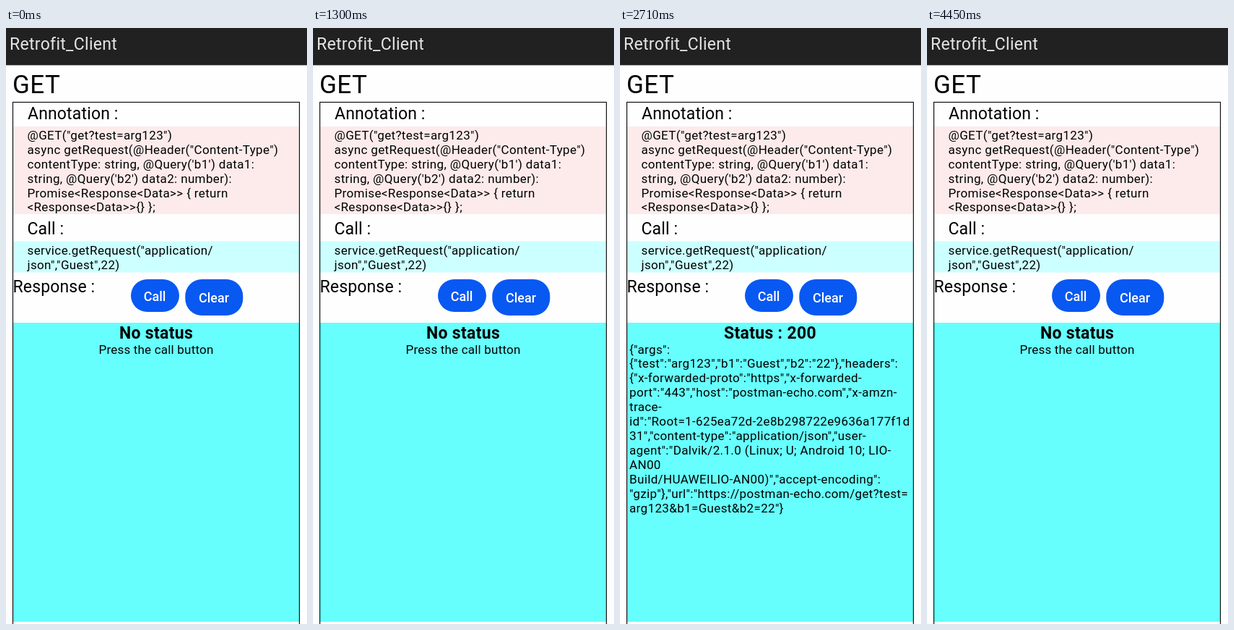
Animation of 417 by 823 pixels, one loop 4.6 s. Source, as an HTML page:

```html
<!DOCTYPE html>
<html lang="en">
<head>
<meta charset="utf-8">
<title>Retrofit_Client</title>
<style>
html, body { margin: 0; width: 100%; height: 100%; overflow: hidden; background: #fefefe; }
svg { display: block; width: 417px; height: 823px; font-family: Roboto, "Noto Sans", sans-serif; }
text { white-space: pre; fill: #000; }
.heading { font-size: 23px; letter-spacing: .15px; }
.title { font-size: 23px; letter-spacing: .3px; fill: #e5e5e5; }
.method { font-size: 35px; letter-spacing: .5px; }
.code { font-size: 17px; letter-spacing: .36px; }
.status { font-size: 23px; font-weight: 700; letter-spacing: .3px; text-anchor: middle; }
.hint { font-size: 17px; letter-spacing: .2px; text-anchor: middle; }
.label { font-size: 18px; font-weight: 500; fill: #fff; text-anchor: middle; }
.button { fill: #0858f2; }
.touch { fill: #fff; stroke: #fff; stroke-opacity: .35; opacity: 0; }

#idle, #result, .touch { animation: 4600ms step-end infinite; }
#idle { animation-name: idle; }
#result { animation-name: result; }
#tapCall { animation-name: tap-call; }
#tapClear { animation-name: tap-clear; }
/* 2100 ms: response arrives, 3660 ms: cleared */
@keyframes idle { 0%, 79.565% { visibility: visible; } 45.652% { visibility: hidden; } }
@keyframes result { 0%, 79.565% { visibility: hidden; } 45.652% { visibility: visible; } }
/* taps at 820 ms and 3660 ms */
@keyframes tap-call { 0%, 23.043% { opacity: 0; } 17.826% { opacity: .36; } 20.435% { opacity: .2; } }
@keyframes tap-clear { 0%, 84.782% { opacity: 0; } 79.565% { opacity: .42; } 82.174% { opacity: .24; } }
</style>
</head>
<body>
<svg viewBox="0 0 417 823">
  <rect width="417" height="823" fill="#fefefe"/>
  <rect width="417" height="51.4" fill="#212121"/>
  <text class="title" x="5" y="29.5">Retrofit_Client</text>
  <text class="method" x="9" y="90">GET</text>

  <rect x="10" y="136" width="396" height="121" fill="#fdebeb"/>
  <rect x="10" y="294.5" width="396" height="43" fill="#ccffff"/>
  <rect x="10" y="407" width="396" height="413" fill="#66fffd"/>
  <rect x="9.5" y="102.5" width="397" height="740" fill="none" stroke="#111" stroke-width="1.2"/>

  <text class="heading" x="30" y="126">Annotation :</text>
  <text class="code" id="annotation"></text>
  <text class="heading" x="29.5" y="285">Call :</text>
  <text class="code" id="call"></text>
  <text class="heading" x="9.5" y="364.5">Response :</text>

  <rect class="button" x="173" y="347" width="67" height="45" rx="22.5"/>
  <text class="label" x="206" y="377">Call</text>
  <rect class="button" x="248.3" y="347" width="80" height="50" rx="23"/>
  <text class="label" x="288" y="379">Clear</text>

  <g id="idle">
    <text class="status" x="208" y="429">No status</text>
    <text class="hint" x="208" y="449.5">Press the call button</text>
  </g>
  <g id="result">
    <text class="status" x="208" y="429">Status : 200</text>
    <text class="code" id="body"></text>
  </g>

  <circle class="touch" id="tapCall" cx="209" cy="373" r="12.5"/>
  <circle class="touch" id="tapClear" cx="311" cy="377" r="12.5"/>
</svg>
<script>
const LINE_HEIGHT = 19.95;

function setLines(id, x, y, lines) {
  const text = document.getElementById(id);
  lines.forEach((line, i) => {
    const span = document.createElementNS(text.namespaceURI, 'tspan');
    span.setAttribute('x', x);
    span.setAttribute('y', y + i * LINE_HEIGHT);
    span.textContent = line;
    text.append(span);
  });
}

setLines('annotation', 29.5, 153.7, [
  '@GET("get?test=arg123")',
  'async getRequest(@Header("Content-Type")',
  "contentType: string, @Query('b1') data1:",
  "string, @Query('b2') data2: number):",
  'Promise<Response<Data>> { return',
  '<Response<Data>>{} };'
]);

setLines('call', 29.5, 313.2, [
  'service.getRequest("application/',
  'json","Guest",22)'
]);

setLines('body', 13, 449.5, [
  '{"args":',
  '{"test":"arg123","b1":"Guest","b2":"22"},"headers":',
  '{"x-forwarded-proto":"https","x-forwarded-',
  'port":"443","host":"postman-echo.com","x-amzn-',
  'trace-',
  'id":"Root=1-625ea72d-2e8b298722e9636a177f1d',
  '31","content-type":"application/json","user-',
  'agent":"Dalvik/2.1.0 (Linux; U; Android 10; LIO-',
  'AN00',
  'Build/HUAWEILIO-AN00)","accept-encoding":',
  '"gzip"},"url":"https://postman-echo.com/get?test=',
  'arg123&b1=Guest&b2=22"}'
]);
</script>
</body>
</html>
```
